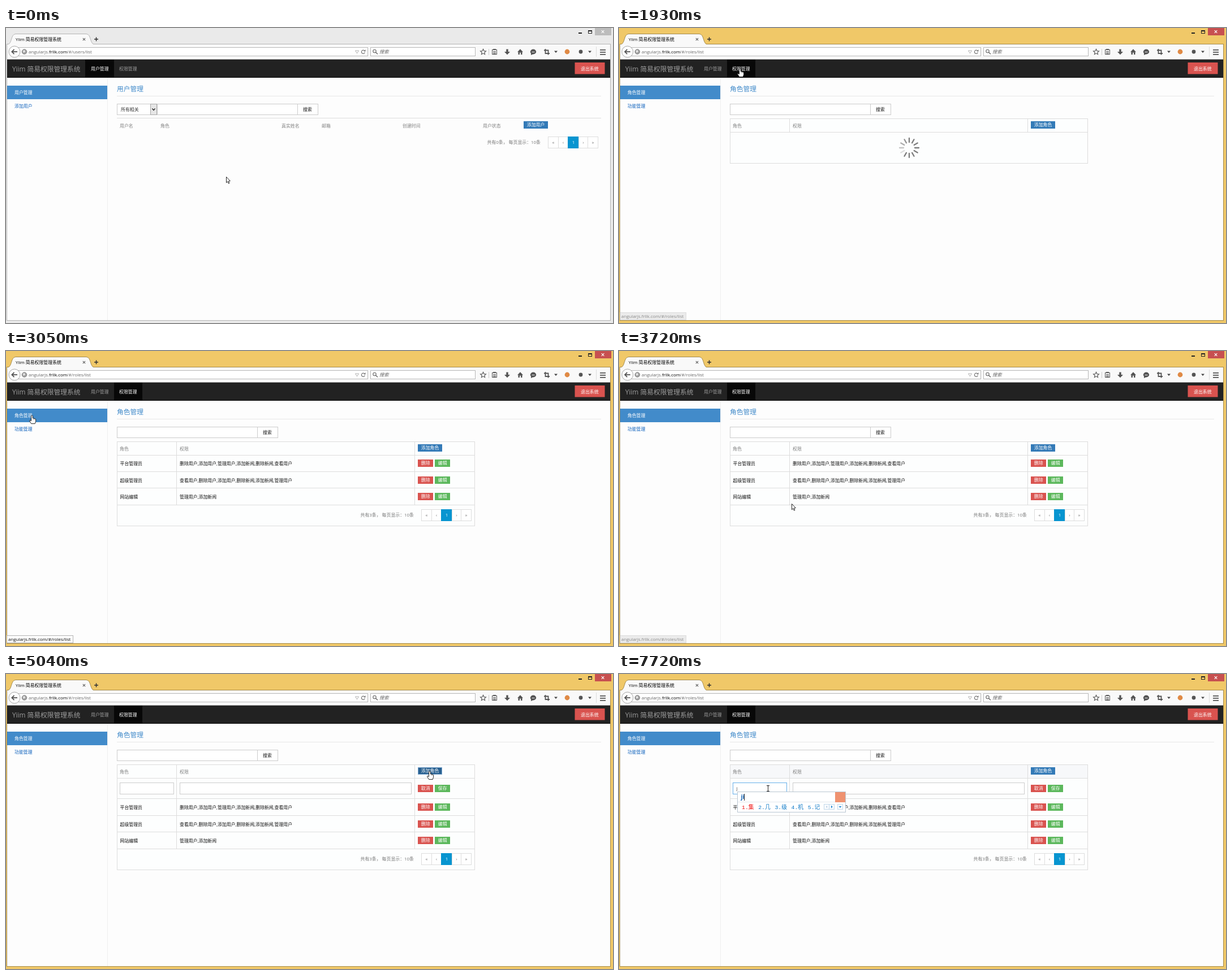
Animation, 1073 px wide and 522 px high, one loop 8000 ms. Source, as an HTML page with a canvas:

```html
<!DOCTYPE html>
<html lang="zh-CN">
<head>
<meta charset="utf-8">
<title>权限管理</title>
<style>
html, body { margin: 0; width: 100%; height: 100%; overflow: hidden; background: #fdfdfd; }
canvas { display: block; width: 1073px; height: 522px; }
</style>
</head>
<body>
<canvas id="stage" width="1073" height="522"></canvas>
<script>
const ctx = document.getElementById('stage').getContext('2d');
const LOOP = 8000;
const SANS = '"Open Sans", "Noto Sans CJK SC", "Noto Sans CJK", sans-serif';
const MONO = '"Liberation Mono", "Noto Sans CJK SC", "Noto Sans CJK", monospace';
const BLUE = '#337ab7', RED = '#d9534f', GREEN = '#5cb85c', LINE = '#dddddd', ICON = '#555';

// time, x, y, kind: a = arrow, h = hand, i = text beam
const POINTER = [
  [0, 389, 263, 'a'], [540, 383, 263, 'a'], [690, 350, 224, 'a'], [810, 285, 150, 'a'],
  [930, 225, 91, 'a'], [1080, 217, 75, 'h'], [1230, 215, 73, 'h'], [1390, 214, 72, 'h'],
  [2080, 217, 77, 'h'], [2240, 222, 83, 'h'], [2390, 225, 92, 'a'], [2540, 110, 119, 'h'],
  [2690, 80, 117, 'h'], [2810, 60, 116, 'h'], [2930, 50, 115, 'h'], [3050, 46, 114, 'h'],
  [3330, 120, 134, 'h'], [3450, 221, 150, 'a'], [3600, 270, 215, 'a'], [3720, 305, 270, 'a'],
  [3870, 317, 288, 'a'], [4010, 440, 255, 'a'], [4130, 600, 215, 'a'], [4250, 715, 188, 'a'],
  [4370, 747, 178, 'h'], [4530, 748, 174, 'h'], [4650, 749, 172, 'h'], [5840, 738, 173, 'h'],
  [6000, 352, 203, 'i'], [6150, 300, 203, 'i'], [6270, 270, 203, 'i'], [6390, 263, 202, 'i']
];

function rect(x, y, w, h, color) {
  ctx.fillStyle = color;
  ctx.fillRect(x, y, w, h);
}

function box(x, y, w, h, fill, border) {
  rect(x, y, w, h, border);
  rect(x + 1, y + 1, w - 2, h - 2, fill);
}

// cy is the vertical centre of the line
function text(s, x, cy, color, size = 7.9, font = SANS, style = '') {
  ctx.font = `${style} ${size}px ${font}`;
  ctx.fillStyle = color;
  ctx.fillText(s, x, cy + size * 0.37);
}

function path(points, { fill, stroke, width = 1, close = true }) {
  ctx.beginPath();
  points.forEach(([x, y]) => ctx.lineTo(x, y));
  if (close) ctx.closePath();
  paint(fill, stroke, width);
}

function circle(x, y, r, fill, stroke, width = 1) {
  ctx.beginPath();
  ctx.arc(x, y, r, 0, Math.PI * 2);
  paint(fill, stroke, width);
}

function paint(fill, stroke, width) {
  if (fill) { ctx.fillStyle = fill; ctx.fill(); }
  if (stroke) { ctx.strokeStyle = stroke; ctx.lineWidth = width; ctx.stroke(); }
}

function line(x1, y1, x2, y2, stroke, width = 1) {
  path([[x1, y1], [x2, y2]], { stroke, width, close: false });
}

function cross(x, y, r, color, width = 1) {
  line(x - r, y - r, x + r, y + r, color, width);
  line(x - r, y + r, x + r, y - r, color, width);
}

function caretDown(x, y, color) {
  path([[x - 3, y - 1.5], [x + 3, y - 1.5], [x, y + 2]], { fill: color });
}

function button(label, x, y, w, color) {
  rect(x, y, w, 13, color);
  text(label, x + 5.8, y + 6.5, '#fff');
}

function windowFrame(active) {
  const edge = active ? '#a58b4d' : '#b4b4b4';
  const bar = active ? '#f0c868' : '#eaeaea';
  rect(0, 0, 1073, 522, bar);
  rect(1, 28, 1068, 490, edge);
  rect(2, 29, 1066, 488, '#fdfdfd');

  rect(1012, 8, 6, 2, '#222');
  box(1029, 4, 7, 6, bar, '#222');
  rect(1029, 4, 7, 2, '#222');
  rect(1041, 0, 29, 13, active ? '#c75050' : '#bcbcbc');
  cross(1055, 6.5, 2.3, '#fff', 1.2);

  ctx.beginPath();
  ctx.moveTo(3, 29);
  ctx.bezierCurveTo(11, 28, 8, 11, 17, 10.5);
  ctx.lineTo(142, 10.5);
  ctx.bezierCurveTo(151, 11, 148, 28, 156, 29);
  paint('#f9f9f9', edge, 1);
  text('Yiim 简易权限管理系统', 17, 20, '#000');
  cross(138, 20, 2.2, '#666', 1.2);
  rect(156, 19, 7, 1.5, '#333');
  rect(158.8, 16.3, 1.5, 7, '#333');
}

function toolbar(url) {
  rect(2, 29, 1066, 26, '#f9f9f9');
  box(16, 34, 624, 16, '#fff', '#b8b8b8');
  circle(15, 42, 10, '#fdfdfd', '#a8a8a8');
  line(10.5, 42, 20, 42, ICON, 1.8);
  path([[14.5, 37.8], [10.3, 42], [14.5, 46.2]], { stroke: ICON, width: 1.8, close: false });

  circle(32.5, 42, 4.3, '#a0a0a0', '#777', 0.8);
  path([[30, 40], [33, 39], [34, 42], [31, 44]], { fill: '#e8e8e8' });
  text('angularjs.', 40, 42, '#666');
  text('frllk.com', 76, 42, '#000');
  text(url, 107.5, 42, '#666');
  path([[617.5, 40], [623.5, 40], [620.5, 45]], { stroke: '#aaa', width: 0.9 });
  ctx.beginPath();
  ctx.arc(631.5, 42.3, 3, 0.3, 5.4);
  paint(null, '#777', 1.2);
  path([[632, 41.5], [635.5, 41.5], [635.5, 38]], { fill: '#777' });

  box(644, 34, 186, 16, '#fff', '#b8b8b8');
  circle(651.5, 41, 2.7, null, '#666', 1.1);
  line(653.5, 43, 657, 46.3, '#666', 1.4);
  text('搜索', 660, 42, '#666', 8.3, SANS, 'italic');
  toolIcons();
  rect(2, 55, 1066, 1, '#999');
}

function toolIcons() {
  const star = [];
  for (let i = 0; i < 10; i++) {
    const a = -Math.PI / 2 + i * Math.PI / 5, r = i % 2 ? 2.4 : 5.2;
    star.push([843.5 + r * Math.cos(a), 42.5 + r * Math.sin(a)]);
  }
  path(star, { stroke: ICON, width: 1.1 });
  rect(853, 37, 1, 11, '#ccc');

  box(859, 38, 9, 9, '#fff', ICON);
  rect(861, 37, 5, 2, ICON);
  for (let y = 41; y < 46; y += 2) rect(861, y, 5, 1, ICON);

  rect(884.3, 37.5, 3.4, 5, ICON);
  path([[881, 42], [891, 42], [886, 47.2]], { fill: ICON });

  path([[904, 42.5], [909, 37.3], [914, 42.5], [912.5, 42.5], [912.5, 47], [910, 47],
    [910, 43.5], [908, 43.5], [908, 47], [905.5, 47], [905.5, 42.5]], { fill: ICON });

  ctx.beginPath();
  ctx.ellipse(932, 42, 5.2, 4.4, 0, 0, Math.PI * 2);
  paint(ICON);
  path([[928, 44], [928, 48], [932, 46]], { fill: ICON });
  line(929.5, 42.5, 934.5, 42.5, '#eee', 1);

  path([[953.5, 37], [953.5, 45], [961, 45]], { stroke: ICON, width: 1.8, close: false });
  path([[951, 39.5], [958.5, 39.5], [958.5, 47.5]], { stroke: ICON, width: 1.8, close: false });
  caretDown(972, 42, '#444');
  circle(992, 42, 4.4, '#e08a45');
  circle(1016, 42, 3.4, '#555');
  caretDown(1032, 42, '#444');
  rect(1043, 33, 1, 18, '#ddd');
  for (let y = 38; y < 48; y += 4) rect(1050, y, 10, 1.6, '#444');
}

function siteHeader(onRoles, hoverRoles) {
  rect(2, 56, 1066, 32, '#222');
  rect(2, 87, 1066, 1, '#080808');
  text('Yiim 简易权限管理系统', 11, 73, '#9d9d9d', 11.75);
  rect(onRoles ? 191 : 140, 56, onRoles ? 50 : 51, 32, '#080808');
  text('用户管理', 150, 72, onRoles ? '#9d9d9d' : '#fff');
  text('权限管理', 200, 72, onRoles || hoverRoles ? '#fff' : '#9d9d9d');
  rect(1005.5, 61, 53, 20.5, RED);
  text('退出系统', 1016, 72, '#fff');
}

function sidebar(first, second) {
  rect(179, 88, 1, 429, '#eeeeee');
  rect(2, 102, 177, 24, '#428bca');
  text(first, 15, 114, '#fff');
  text(second, 15, 138.5, '#0f62bd');
  text(first, 196, 108, '#428bca', 11.75);
  rect(196, 120, 856, 1, '#e8e8e8');
}

function searchBar(x) {
  box(x, 134, 249, 20, '#fff', '#ccc');
  box(x + 248, 134, 37, 20, '#fff', '#ccc');
  text('搜索', x + 258, 144, '#111');
}

function pager(x, y, total) {
  text(`共有${total}条， 每页显示：10条`, x - 107.5, y + 10.5, '#777');
  const stops = [0, 18, 35, 54, 70, 88];
  ['«', '‹', '1', '›', '»'].forEach((s, i) => {
    const on = i === 2, w = stops[i + 1] - stops[i];
    box(x + stops[i], y, w + 1, 21, on ? '#0895d0' : '#fff', on ? '#0895d0' : LINE);
    ctx.textAlign = 'center';
    text(s, x + stops[i] + w / 2 + 0.5, y + 10.5, on ? '#fff' : '#777');
    ctx.textAlign = 'left';
  });
}

function usersPage() {
  sidebar('用户管理', '添加用户');
  box(196, 134, 72, 20, '#fff', '#ccc');
  text('所有相关', 203, 144, '#333');
  box(255, 134, 12, 20, '#e6e6e6', '#aaa');
  path([[258.5, 142.5], [261, 145.5], [263.5, 142.5]], { stroke: '#222', width: 1.3, close: false });
  searchBar(267);
  rect(196, 159, 856, 1, LINE);
  const heads = { 用户名: 201, 角色: 273, 真实姓名: 487, 邮箱: 558, 创建时间: 701, 用户状态: 843 };
  for (const name in heads) text(name, heads[name], 173.5, '#808080');
  button('添加用户', 915, 165, 43, BLUE);
  pager(958, 192, 0);
}

function tableGrid(rows, bottom) {
  rect(196, 160, 633, bottom - 159, '#fdfefe');
  [160, ...rows, bottom].forEach(y => rect(196, y, 633, 1, LINE));
  const end = rows[rows.length - 1];
  [196, 828].forEach(x => rect(x, 160, 1, bottom - 160, LINE));
  [301, 722].forEach(x => rect(x, 160, 1, end - 160, LINE));
}

function spinner(x, y) {
  ctx.lineCap = 'round';
  for (let i = 0; i < 12; i++) {
    const a = (150 + i * 30) * Math.PI / 180, c = Math.cos(a), s = Math.sin(a);
    const shade = Math.round(Math.max(125, 222 - i * 25));
    line(x + 10 * c, y + 10 * s, x + 17 * c, y + 17 * s, `rgb(${shade},${shade},${shade})`, 2.3);
  }
  ctx.lineCap = 'butt';
}

function rolesPage(t) {
  const loading = t < 2080, adding = t >= 5040, shift = adding ? 37 : 0;
  sidebar('角色管理', '功能管理');
  searchBar(196);

  if (loading) tableGrid([184], 239);
  else tableGrid([184, ...(adding ? [220] : []), 213 + shift, 242 + shift, 272 + shift], 309 + shift);
  if ((t >= 4370 && t < 4920) || t >= 6390) {
    [[197, 104], [302, 420], [723, 105]].forEach(([x, w]) => rect(x, 161, w, 23, '#f7f8fa'));
  }
  text('角色', 201, 173.5, '#808080');
  text('权限', 307, 173.5, '#808080');
  const hot = t >= 4370 && t < 6150;
  button('添加角色', 728, 165, 43, hot ? '#286090' : BLUE);
  if (t >= 4920 && t < 6390) {
    ctx.strokeStyle = '#7fa9d0';
    ctx.lineWidth = 1;
    ctx.strokeRect(728.5, 165.5, 42, 12);
  }
  if (loading) return spinner(513, 212);

  if (adding) {
    box(201, 192, 96, 21, '#fff', t >= 6270 ? '#66afe9' : '#ccc');
    box(307, 192, 410, 21, '#fff', '#ccc');
    button('取消', 728, 196, 27, RED);
    button('保存', 758, 196, 27, GREEN);
  }
  const rows = [
    ['平台管理员', '删除用户,添加用户,管理用户,添加新闻,删除新闻,查看用户'],
    ['超级管理员', '查看用户,删除用户,添加用户,删除新闻,添加新闻,管理用户'],
    ['网站编辑', '管理用户,添加新闻']
  ];
  rows.forEach(([role, rights], i) => {
    const cy = 199 + Math.round(i * 29.6) + shift;
    text(role, 201.5, cy, '#111');
    text(rights, 307, cy, '#111');
    button('删除', 728, cy - 7, 27, RED);
    button('编辑', 758, cy - 7, 27, GREEN);
  });
  pager(734, 280 + shift, 3);

  if (t >= 7720) inputPopup();
  else if (t >= 6270 && (t < 7040 || t >= 7440)) rect(206, 197, 1, 11, '#222');
}

function inputPopup() {
  text('j', 207.5, 202, '#444');
  box(209, 208, 192, 37, '#fff', '#b9c6d2');
  rect(210, 226, 190, 1, '#e3e8ed');
  text('ji', 215.5, 217.5, '#1566b8', 10, SANS, 'bold');
  rect(221, 212, 1, 12, '#222');
  ['集', '几', '级', '机', '记'].forEach((s, i) => {
    text(`${i + 1}.${s}`, 217 + i * 29.2, 235, i ? '#0f7ac8' : '#f01010', 9.8, MONO);
  });
  [362, 371, 386].forEach(x => box(x, 230, 10, 10, '#f8fbfe', '#c3d9ea'));
  path([[368, 233], [368, 237], [366, 235]], { fill: '#aac4da' });
  path([[375, 232.5], [375, 237.5], [377.7, 235]], { fill: '#1c86d1' });
  path([[388.5, 234], [393.5, 234], [391, 236.7]], { fill: '#1c86d1' });
  rect(382, 209, 18, 18, '#ef9270');
}

function statusLabel(t) {
  const full = (t >= 1540 && t < 1930) || (t >= 2810 && t < 3600);
  const fading = (t >= 1930 && t < 2080) || (t >= 3600 && t < 3870);
  if (!full && !fading) return;
  ctx.globalAlpha = full ? 1 : 0.45;
  box(1, 503, 118, 14, '#fbfbfb', '#b5b5b5');
  text('angularjs.frllk.com/#/roles/list', 4, 510.5, '#111');
  ctx.globalAlpha = 1;
}

function pointer(t) {
  const [, x, y, kind] = POINTER.filter(p => p[0] <= t).pop();
  ctx.save();
  ctx.translate(x, y);
  if (kind === 'a') {
    path([[0.5, 0.5], [0.5, 10.8], [2.8, 8.6], [4.4, 12.3], [5.9, 11.6], [4.4, 8], [7.3, 7.7]],
      { fill: '#fff', stroke: '#111', width: 0.9 });
  } else if (kind === 'h') {
    path([[-1.5, 0.5], [-0.8, 0], [0.6, 0], [1.2, 0.8], [1.2, 4.8], [5.5, 5.8], [6.6, 7],
      [6.6, 10.5], [5.2, 14.6], [-1.3, 14.6], [-4.4, 9.8], [-4, 8.4], [-1.5, 9.5]],
      { fill: '#fff', stroke: '#111', width: 0.9 });
    line(2.6, 5.5, 2.6, 8, '#777', 0.6);
    line(4.5, 6, 4.5, 8, '#777', 0.6);
  } else {
    rect(0, -4, 1, 9, '#222');
    rect(-2, -5, 5, 1, '#222');
    rect(-2, 5, 5, 1, '#222');
  }
  ctx.restore();
}

function draw(t) {
  const onRoles = t >= 1930;
  windowFrame(t >= 1780);
  toolbar(onRoles ? '/#/roles/list' : '/#/users/list');
  siteHeader(onRoles, t >= 1080);
  if (onRoles) rolesPage(t);
  else usersPage();
  statusLabel(t);
  pointer(t);
}

const start = performance.now();
function tick() {
  draw((performance.now() - start) % LOOP);
  requestAnimationFrame(tick);
}
tick();
</script>
</body>
</html>
```
